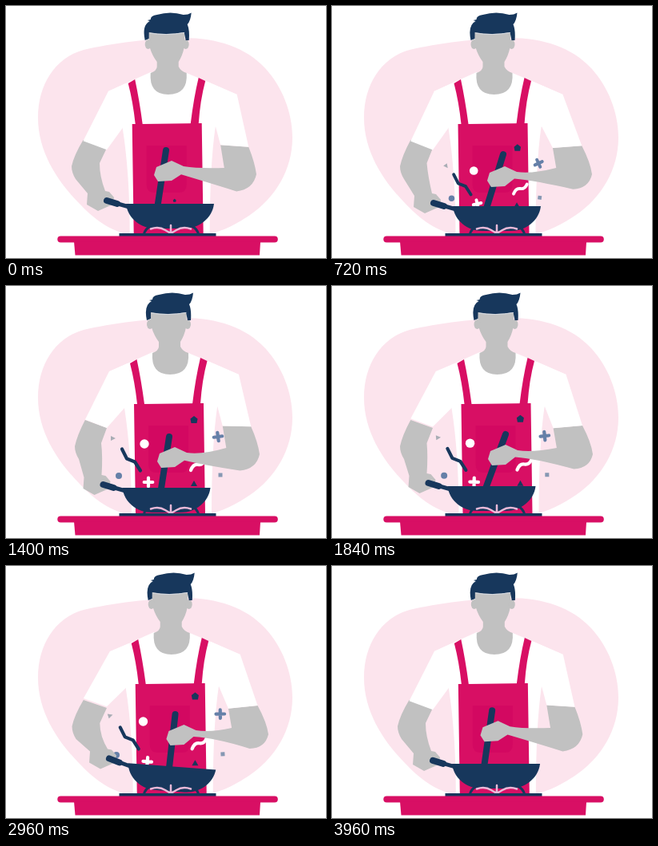
These frames come from a looping animation (400 px wide and 316 px high, 4 s). An HTML page:

```html
<!DOCTYPE html>
<html lang="en">
<head>
<meta charset="utf-8">
<title>Cooking</title>
<style>
  html, body { margin: 0; width: 100%; height: 100%; overflow: hidden; background: #fff; }
  svg { display: block; width: 100%; height: 100%; }
  .pink { fill: #d80f64; }
  .navy { fill: #17375c; }
  .skin { fill: #c1c1c1; }
  .white { fill: #fff; }
  .line { fill: none; stroke-linecap: round; stroke-linejoin: round; }
  .navyLine { stroke: #17375c; }
</style>
</head>
<body>
<svg viewBox="0 0 400 316">
  <path fill="#fce4ed" d="M40 140C40 99 61 65 97 55C130 47 185 40 222 40C264 40 300 52 324 78C345 101 358 133 358 165C358 205 337 240 305 262C286 275 262 288 235 288L158 288C128 282 108 265 91 247C62 217 40 181 40 140Z"/>

  <g id="body">
    <path class="white" d="M181 83L150 97L128 107L146 153Q155 210 155 286L255 286Q255 200 262 152L289 111L250 94L226 84Z"/>
    <path class="skin" d="M178 31L224 31L223 52Q221 62 216 70L216 76Q219 82 226 84Q228 111 203 111Q179 111 181 84Q189 81 189 76L189 70Q183 62 180 52Z"/>
    <ellipse class="skin" cx="178" cy="48" rx="4" ry="6"/>
    <ellipse class="skin" cx="225" cy="48" rx="4" ry="6"/>
    <path class="navy" d="M174 43Q170 24 180 19L177 18L181 17Q181 12 189 11Q206 6 222 11Q228 11 232 8.500Q231 19 227 23Q230 30 229 43L225 43L223 33Q200 37 179 33L179 41Z"/>
    <path class="line" stroke="#d5dae2" d="M180 34Q200 37.500 223 33.500"/>
    <path class="pink" d="M153 97L161.500 92Q167 118 171 148L245 147L247 286L160 286L158 148L162 148Q159 120 153 97ZM241 90L249.500 94Q243 118 241 148L231 148Q235 115 241 90Z"/>
    <path fill="#d30861" d="M176 175L226 175L226 224Q226 234 216 234L186 234Q176 234 176 224Z"/>
  </g>

  <g id="bits"></g>
  <path id="spoon" class="line navyLine" stroke-width="8"/>
  <path id="armR" class="skin"/>
  <path id="armL" class="skin"/>
  <path id="sleeveR" class="white"/>
  <path id="sleeveL" class="white"/>
  <g id="frontBits"></g>

  <path class="line navyLine" stroke-width="3" d="M172 287Q174 279 181 276M241 287Q239 279 232 276"/>
  <g id="pan">
    <path class="navy" d="M-55 0L55 0C53 18 36 31 18 31L-18 31C-37 31 -53 18 -55 0Z"/>
    <path class="line navyLine" stroke-width="8" d="M-79 -4L-66 0"/>
    <path class="line navyLine" stroke-width="5" d="M-72 -2L-51 4"/>
  </g>
  <path class="line" stroke="#e9b9d8" stroke-width="2.5" d="M181 279.500Q191 276 199 281T206 284M231 279.500Q221 276 213 281T206 284M206 275L206 284"/>
  <rect class="navy" x="141.500" y="285" width="121" height="4"/>
  <rect class="pink" x="64.300" y="288.500" width="275.500" height="8" rx="4"/>
  <path class="pink" d="M85 295.500L318 295.500L317 312.500L86.500 312.500Z"/>
</svg>

<script>
const LOOP = 4000, STEP = 40;
const byId = id => document.getElementById(id);
const clamp = (v, lo, hi) => Math.min(hi, Math.max(lo, v));

// time, pan x y angle, right hand dx dy, right elbow x, spoon top x y, spoon foot x, lean, left elbow x
const poses = [
  [0,    205, 248, 0,     0, 0, 313,   200, 181, 189,   -0.3, 82],
  [720,  206, 251, 0,     9, 7, 325,   214, 186, 193,   -0.5, 85],
  [1080, 204, 252, 0,    -2, 5, 311,   197, 184, 186,   0.8, 86],
  [1400, 200.5, 253, 0,   4, 8, 317,   204, 189, 194,   2, 86],
  [1840, 199.5, 251, 0,  10, 5, 326,   217, 186, 192,   3.5, 85],
  [2520, 205, 254, 6.5, -12, -2, 302,  190.5, 179, 171, 3.8, 82],
  [3140, 208, 250, 3,    26, 8, 338,   220, 189, 217,   3.6, 83],
  [3400, 207, 248.5, 1.2, 20, 9, 331,  215, 190, 214,   3, 84]
];

// Smooth periodic curve through the poses
function poseAt(t) {
  const n = poses.length;
  const at = (i, k) => poses[(i + n) % n][k] + (k ? 0 : Math.floor(i / n) * LOOP);
  let i = n - 1;
  while (poses[i][0] > t) i--;
  const span = at(i + 1, 0) - at(i, 0), u = (t - at(i, 0)) / span;
  const slope = (j, k) => (at(j + 1, k) - at(j - 1, k)) / (at(j + 1, 0) - at(j - 1, 0)) * span;
  return poses[0].map((_, k) => {
    const a = at(i, k), b = at(i + 1, k), v = u - 1;
    return a * (1 + 2 * u) * v * v + b * u * u * (3 - 2 * u) + slope(i, k) * u * v * v + slope(i + 1, k) * u * u * v;
  });
}

const cross = 'M-5.300 0L5.300 0M0 -5.300L0 5.300';
const disc = r => `M${-r} 0A${r} ${r} 0 1 1 ${r} 0A${r} ${r} 0 1 1 ${-r} 0Z`;
const navy = '#17375c', blue = '#6580a8';
const bits = [
  { x: 173, y: 198, d: disc(5.7), fill: '#fff' },
  { x: 235, y: 168, d: 'M0 -5L4.500 -1.500L3.500 4L-3.500 4L-4.500 -1.500Z', fill: navy, lead: 110 },
  { x: 265, y: 189, d: cross, stroke: blue, tilt: -8, spin: -150, lead: 80, layer: 'frontBits' },
  { x: 133, y: 191, d: 'M-2 -3L4 0L-2 3Z', fill: '#a9adb5', spin: 400 },
  { x: 157, y: 217.5, d: 'M-12 -13L-6 -1L4 3L11 14', stroke: navy, end: 3940 },
  { x: 141, y: 238, d: disc(4), fill: blue },
  { x: 178, y: 246, d: cross, stroke: '#fff', spin: -100 },
  { x: 240, y: 224, d: 'M-9 7Q-6 -1 0 0T9 -6', stroke: '#fff', end: 3940 },
  { x: 268, y: 237, d: 'M-2.500 -2.500L2.500 -2.500L2.500 2.500L-2.500 2.500Z', fill: '#8698b3', spin: 60 },
  { x: 235, y: 248, d: 'M-4 3L0 -4L4 3Z', fill: navy }
];
for (const bit of bits) {
  const parent = byId(bit.layer || 'bits');
  bit.el = document.createElementNS(parent.namespaceURI, 'path');
  bit.el.setAttribute('d', bit.d);
  bit.el.setAttribute('class', bit.stroke ? 'line' : '');
  if (bit.stroke) {
    bit.el.setAttribute('stroke', bit.stroke);
    bit.el.setAttribute('stroke-width', 4.2);
  } else bit.el.setAttribute('fill', bit.fill);
  parent.append(bit.el);
}

// Bits burst out of the pan, drift outwards, then shrink away
function drawBits(t) {
  const origin = { x: 205, y: 262 };
  for (const { el, x, y, lead = 0, tilt = 0, spin = 0, end = 3850 } of bits) {
    const rise = 1 - Math.pow(1 - clamp((t + lead) / (1400 + lead), 0, 1), 2.8);
    const spread = rise + 0.06 * clamp((t - 1400) / 2000, 0, 1.2);
    const left = clamp((end - t) / (end > 3900 ? 520 : 600), 0, 1);
    const size = Math.sqrt(rise) * left;
    const angle = tilt + spin * (1 - spread) + (spin ? 90 * (1 - left) : 0);
    const px = origin.x + (x - origin.x) * spread, py = origin.y + (y - origin.y) * spread;
    el.setAttribute('transform', `translate(${px} ${py}) rotate(${angle}) scale(${size})`);
    el.setAttribute('visibility', size > 0.01 ? 'visible' : 'hidden');
  }
}

const setPath = (id, d) => byId(id).setAttribute('d', d);

function draw(t) {
  const [, panX, panY, panAngle, hx, hy, elbow, topX, topY, footX, lean, elbowL] = poseAt(t);
  byId('body').setAttribute('transform', `translate(${lean} 0)`);
  byId('pan').setAttribute('transform', `translate(${panX} ${panY}) rotate(${panAngle})`);
  setPath('spoon', `M${topX} ${topY}L${footX} 254`);

  // The forearm gets slimmer as the elbow swings out
  const e = elbow - 302;
  const cuff = `${295 + e * 0.75} ${178 - e * 0.12}`;
  const inner = `${261 + e * 0.65} ${171 + e * 0.3}`;
  const hand = (x, y) => `${x + hx} ${y + hy}`;
  setPath('armR', `M${inner}L${cuff}Q${elbow - 2} 196 ${elbow} 211` +
    `Q${elbow - 4} ${231 - e * 0.1} ${276 + e * 1.1} ${235 - e * 0.23}Q${hand(246, 226 - e * 0.6)} ${hand(219, 213 - e * 0.15)}` +
    `L${hand(207, 219)}L${hand(190, 220)}L${hand(185, 212)}L${hand(188, 202)}L${hand(207, 194)}L${hand(222, 201)}` +
    `Q${hand(240, 204)} ${266 + e * 0.62} 203Z`);
  setPath('sleeveR', `M${250 + lean} 94L${289 + lean} 111L${cuff}L${inner}L${262 + lean} 150Z`);

  const a = panAngle * Math.PI / 180;
  const gripX = panX - 79 * Math.cos(a) + 5 * Math.sin(a) - 126;
  const gripY = panY - 79 * Math.sin(a) - 5 * Math.cos(a) - 243;
  const grip = (x, y) => `${x + gripX} ${y + gripY}`;
  const shift = elbowL - 82, cuffL = 96.5 + shift * 0.6;
  setPath('armL', `M${cuffL} 168Q${elbowL + 3} 187 ${elbowL} 201Q${elbowL} 209 ${elbowL + 5} 217` +
    `L${grip(102, 235)}L${grip(101, 249)}L${grip(115, 257)}L${grip(133, 249)}L${grip(135, 240)}L${grip(129, 233)}L${grip(124, 232)}` +
    `Q${117 + shift} 214 ${117 + shift * 0.5} 197L126 178Z`);
  setPath('sleeveL', `M${150 + lean} 97L${128 + lean * 0.5} 107L${cuffL} ${169 - lean * 0.8}L126 ${180 - lean}L${146 + lean} 153Z`);
  drawBits(t);
}

const start = performance.now();
function tick(now) {
  const t = Math.max(0, now - start) % LOOP;
  draw(Math.floor(t / STEP) * STEP);
  requestAnimationFrame(tick);
}
draw(0);
requestAnimationFrame(tick);
</script>
</body>
</html>
```
